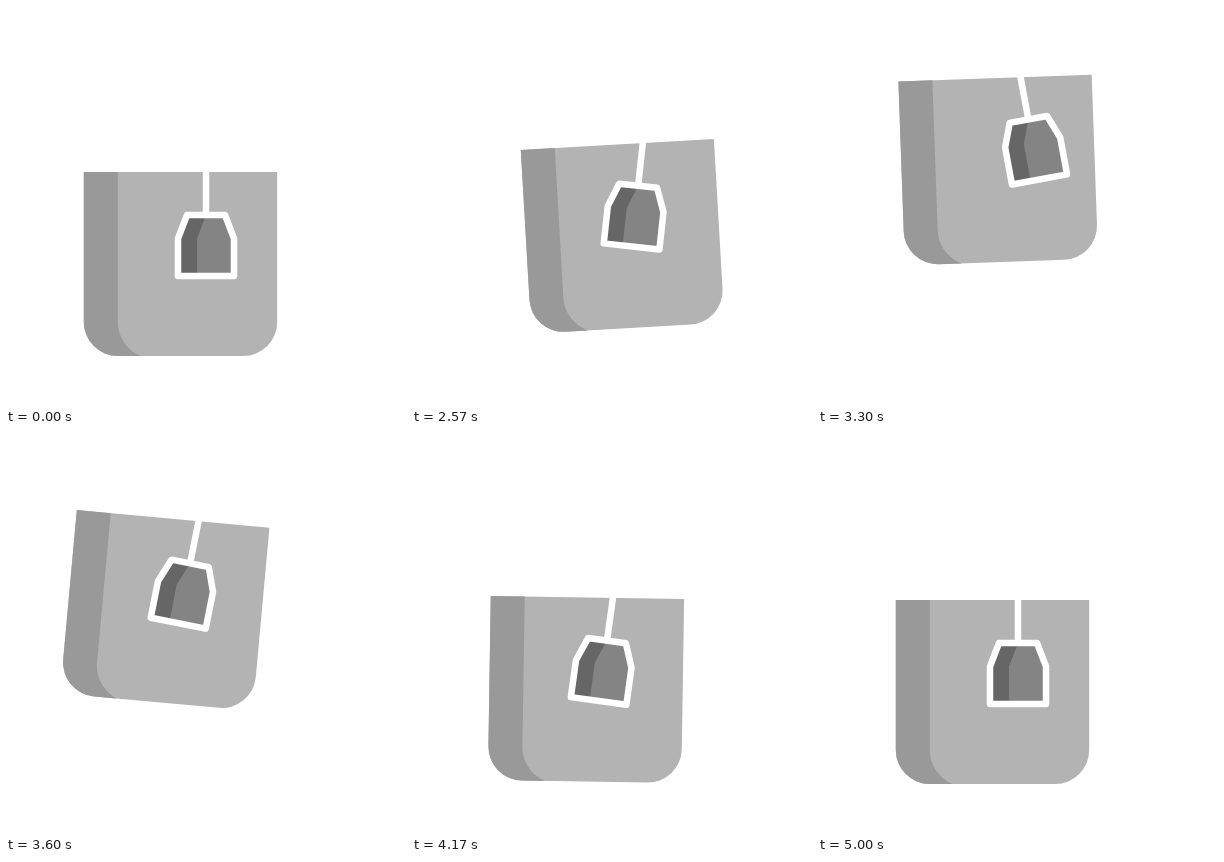
Animation of 400 by 400 pixels, one loop 5200 ms. Source, as an HTML page with a canvas:

```html
<!DOCTYPE html>
<html lang="en">
<head>
<meta charset="utf-8">
<title>Tea cup</title>
<style>
  html, body { margin: 0; width: 100%; height: 100%; overflow: hidden; background: #fff; }
  canvas { display: block; width: 400px; height: 400px; }
</style>
</head>
<body>
<canvas id="stage"></canvas>
<script>
const LOOP = 5200;
const RAD = Math.PI / 180;
const HALF_W = 96.7, HALF_H = 92, CORNER = 34;
const canvas = document.getElementById('stage');
const ctx = canvas.getContext('2d');
const ratio = window.devicePixelRatio || 1;
canvas.width = canvas.height = 400 * ratio;

// Cup poses along its round trip: time, x, y, tilt
const cupPath = [
  [2000, 174.5, 258, 0],
  [2570, 210.6, 230.4, -3.3],
  [2790, 216, 208, -7.2],
  [3000, 205.4, 185, -8.9],
  [3330, 178, 163.7, -1.3],
  [3600, 158.8, 176.4, 5.2],
  [4000, 169.7, 236.5, 4.2],
  [4170, 174, 255.5, 0.9],
  [4250, 174.5, 258, 0]
];
// Turning points of the swinging tag: time, angle
const tagTurns = [
  [2000, 0], [2520, 10.2], [3000, -15.6], [3930, 14.4], [4500, -5], [4740, 3], [5000, 0]
];

const clamp = (v, lo, hi) => Math.min(hi, Math.max(lo, v));

// Index of the key that starts the span around t
function spanAt(keys, t) {
  let i = 0;
  while (i < keys.length - 2 && t > keys[i + 1][0]) i++;
  return i;
}

// Slope at key i from its neighbours, at rest on both ends
function slope(keys, i, col) {
  if (i === 0 || i === keys.length - 1) return 0;
  const [p, k, n] = [keys[i - 1], keys[i], keys[i + 1]];
  const before = k[0] - p[0], after = n[0] - k[0];
  const inV = (k[col] - p[col]) / before, outV = (n[col] - k[col]) / after;
  return (inV * after + outV * before) / (before + after);
}

function smoothPath(keys, t, col) {
  const i = spanAt(keys, t), a = keys[i], b = keys[i + 1];
  const d = b[0] - a[0], u = clamp((t - a[0]) / d, 0, 1), w = 1 - u;
  const bend = slope(keys, i, col) * w - slope(keys, i + 1, col) * u;
  return a[col] + (b[col] - a[col]) * u * u * (3 - 2 * u) + d * u * w * bend;
}

function swing(keys, t) {
  const i = spanAt(keys, t), [t0, a] = keys[i], [t1, b] = keys[i + 1];
  const u = clamp((t - t0) / (t1 - t0), 0, 1);
  return a + (b - a) * (1 - Math.cos(Math.PI * u)) / 2;
}

function polygon(points) {
  ctx.beginPath();
  points.forEach(([x, y]) => ctx.lineTo(x, y));
  ctx.closePath();
}

function fill(color) {
  ctx.fillStyle = color;
  ctx.fill();
}

function drawCup() {
  ctx.beginPath();
  ctx.moveTo(-HALF_W, -HALF_H);
  ctx.lineTo(HALF_W, -HALF_H);
  ctx.arcTo(HALF_W, HALF_H, 0, HALF_H, CORNER);
  ctx.arcTo(-HALF_W, HALF_H, -HALF_W, 0, CORNER);
  ctx.closePath();
  fill('#b3b3b3');

  // Shaded side
  const edge = CORNER - HALF_W;
  ctx.beginPath();
  ctx.moveTo(-HALF_W, -HALF_H);
  ctx.lineTo(edge, -HALF_H);
  ctx.lineTo(edge, HALF_H - CORNER);
  ctx.bezierCurveTo(edge, 73, -53.5, 86, -40, HALF_H);
  ctx.arcTo(-HALF_W, HALF_H, -HALF_W, 0, CORNER);
  ctx.closePath();
  fill('#999');
}

// Origin is where the string meets the rim
function drawTag() {
  ctx.strokeStyle = '#fff';
  ctx.lineWidth = 6.5;
  ctx.lineJoin = 'round';
  ctx.beginPath();
  ctx.moveTo(0, -6);
  ctx.lineTo(0, 43);
  ctx.stroke();

  const left = [[-28, 104], [-28, 66.5], [-19, 43]];
  const outline = [...left, [19, 43], [28, 66.5], [28, 104]];
  polygon(outline);
  fill('#848484');
  polygon([...left, [0, 43], [-9, 66.5], [-9, 104]]);
  fill('#666');
  polygon(outline);
  ctx.stroke();
}

function draw(t) {
  ctx.setTransform(ratio, 0, 0, ratio, 0, 0);
  ctx.fillStyle = '#fff';
  ctx.fillRect(0, 0, 400, 400);
  const [x, y, tilt] = [1, 2, 3].map(col => smoothPath(cupPath, t, col));
  ctx.translate(x, y);
  ctx.rotate(tilt * RAD);
  drawCup();
  ctx.translate(25.5, -HALF_H);
  ctx.rotate(swing(tagTurns, t) * RAD);
  drawTag();
}

const start = performance.now();
function tick() {
  draw((performance.now() - start) % LOOP);
  requestAnimationFrame(tick);
}
tick();
</script>
</body>
</html>
```
